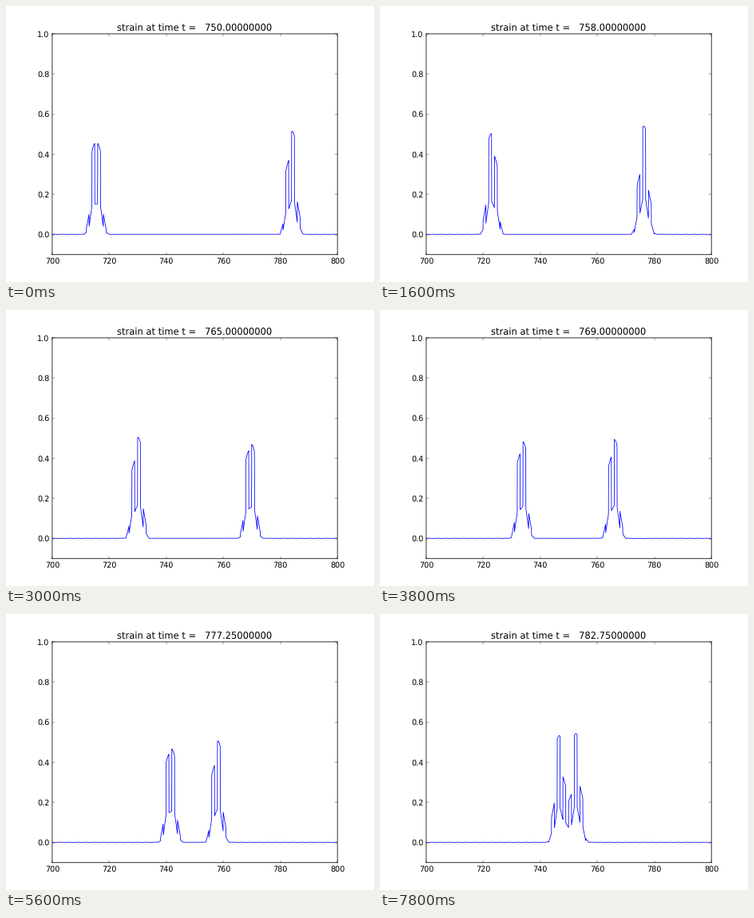
Write a matplotlib script that moves like this. It is 461x346 px and loops after 8 s.

```python
import numpy as np
import matplotlib.pyplot as plt
from matplotlib.animation import FuncAnimation
from matplotlib.transforms import Affine2D

W, H, DPI = 461, 346, 64
PX = 72 / DPI  # points per pixel
STEP_MS = 200
SHIFT = 0.29  # frame offset from the curve, in pixels

plt.rcParams["font.family"] = "DejaVu Sans"
plt.rcParams["text.hinting"] = "none"

# The clock slows down as the two pulses approach each other.
STEPS = [0] + [1] * 25 + [0.75] * 6 + [0.5] * 5 + [0.25] * 3
TIMES = 750 + np.cumsum(STEPS)

SPEED = 0.957
LEFT, RIGHT = 715.5, 783.95  # pulse centres at t = 750

CELLS = 24
X = 700 + (np.arange(100 * CELLS) + 0.5) / CELLS
EDGES = np.arange(700, 801)
SOFT = np.floor(X) % 2 == 0
FRAC = X % 1


def pulse(center):
    """Strain on the soft side of every layer edge."""
    side = np.where(EDGES % 2 == 0, 1, -1)
    u = side * (EDGES - center) + 0.4
    decay = 0.21 - 0.004 * u + 6e-5 * (u - 3) * u**5
    return 0.535 * np.exp(-decay * u**2)


def strain(t):
    a = LEFT + SPEED * (t - 750)
    b = RIGHT - SPEED * (t - 750)
    h = np.interp(X, EDGES, pulse(a) + pulse(b))
    soft = h + 0.13 * FRAC * (1 - FRAC) * h**2
    stiff = h / (2.65 + 0.75 * h)
    # faint ripples trailing behind the pulses
    tail = np.maximum(a - 5 - X, X - b - 5)
    ripple = np.where(tail > 0, 0.0006 * np.sin(2.1 * tail), 0)
    return np.where(SOFT, soft, stiff) + ripple


fig = plt.figure(figsize=(W / DPI, H / DPI), dpi=DPI, facecolor="white")
ax = fig.add_axes([0.125 + SHIFT / W, 0.1 - SHIFT / H, 0.775, 0.8])
ax.set_xlim(700, 800)
ax.set_ylim(-0.1, 1.0)
ax.set_xticks(range(700, 801, 20))
ax.set_yticks(np.arange(6) / 5)
ax.tick_params(direction="in", top=True, right=True, length=3.2 * PX,
               width=0.4 * PX, pad=3.2 * PX, labelsize=9.6 * PX)
for spine in ax.spines.values():
    spine.set_linewidth(0.8 * PX)
    spine.set_snap(False)

line, = ax.plot(X, strain(750), color="blue", lw=0.8 * PX)
line.set_transform(ax.transData + Affine2D().translate(-SHIFT, SHIFT))
title = ax.set_title("", fontsize=11.52 * PX, pad=4.4 * PX)


def draw(i):
    t = TIMES[i]
    line.set_ydata(strain(t))
    title.set_text(f"strain at time t =   {t:.8f}")
    return line, title


anim = FuncAnimation(fig, draw, frames=len(TIMES), interval=STEP_MS,
                     repeat=True, repeat_delay=0, blit=False)
plt.show()
```
